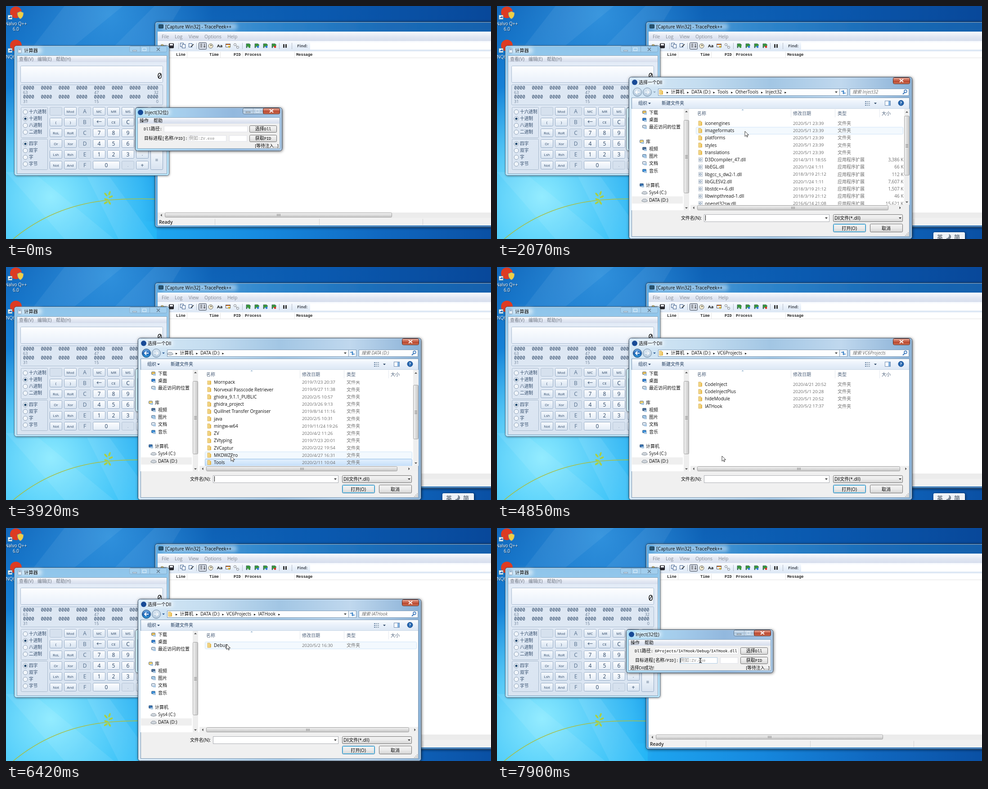
Animation of 1078 by 519 pixels, one loop 8000 ms. Source, as an HTML page:

```html
<!DOCTYPE html>
<html lang="zh">
<head>
<meta charset="utf-8">
<title>Inject</title>
<style>
html,body{margin:0;width:100%;height:100%;overflow:hidden;background:#1478cc}
svg{display:block;width:1078px;height:519px;font:10px 'Open Sans','Noto Sans CJK SC',sans-serif}
text{white-space:pre}
.m{font-family:'Liberation Mono','Noto Sans CJK SC',monospace;font-size:8.7px}
.n{font-family:'Noto Sans Mono','DejaVu Sans Mono',monospace}
.a{font-family:'DejaVu Sans',sans-serif;font-size:8px}
</style>
</head>
<body>
<svg id="stage" viewBox="0 0 1078 519"></svg>
<script>
const stage = document.getElementById('stage');

// ---- drawing helpers
const R = (x, y, w, h, fill, stroke, rx = 0, extra = '') => {
  const o = stroke ? .5 : 0;
  return `<rect x="${x + o}" y="${y + o}" width="${w - 2 * o}" height="${h - 2 * o}" fill="${fill}" stroke="${stroke || 'none'}" rx="${rx}" ${extra}/>`;
};
const T = (x, y, s, fill = '#000', size = 10, extra = '') =>
  `<text x="${x}" y="${y + size * .36}" fill="${fill}" font-size="${size}" ${extra}>${s}</text>`;
const M = (x, y, s, fill = '#000', extra = '') =>
  `<text class="m" x="${x}" y="${y + 3.2}" fill="${fill}" ${extra}>${s.replace(/[\u4e00-\u9fff]+/g, c => `<tspan font-size="10">${c}</tspan>`)}</text>`;
const P = (d, fill = 'none', stroke = 'none', w = 1, extra = '') =>
  `<path d="${d}" fill="${fill}" stroke="${stroke}" stroke-width="${w}" ${extra}/>`;
const C = (x, y, r, fill, stroke = 'none', w = 1) =>
  `<circle cx="${x}" cy="${y}" r="${r}" fill="${fill}" stroke="${stroke}" stroke-width="${w}"/>`;
const G = (id, body, extra = '') => `<g id="${id}" ${extra}>${body}</g>`;
const mid = 'text-anchor="middle"', end = 'text-anchor="end"', bold = 'font-weight="700"';
const down = (x, y, f = '#222', r = 3) => P(`M${x - r},${y - r / 2}h${2 * r}l${-r},${r}z`, f);
const up = (x, y, f = '#444', r = 3) => P(`M${x - r},${y + r / 2}h${2 * r}l${-r},${-r}z`, f);
const left = (x, y) => P(`M${x + 1.5},${y - 3}v6l-3,-3z`, '#444');
const right = (x, y) => P(`M${x - 1.5},${y - 3}v6l3,-3z`, '#444');
const lin = (id, across, ...cols) =>
  `<linearGradient id="${id}" x2="${across ? 1 : 0}" y2="${across ? 0 : 1}">` +
  cols.map((c, i) => `<stop offset="${i / (cols.length - 1)}" stop-color="${c}"/>`).join('') + '</linearGradient>';
const rad = (id, x, y, r, c) =>
  `<radialGradient id="${id}" gradientUnits="userSpaceOnUse" cx="${x}" cy="${y}" r="${r}"><stop stop-color="${c}"/><stop offset="1" stop-color="${c}" stop-opacity="0"/></radialGradient>`;
const clip = (id, x, y, w, h) => `<clipPath id="${id}">${R(x, y, w, h, '#000')}</clipPath>`;
const glow = (x, y, w, h, o = .6) => R(x, y, w, h, '#fff', '', 6, `opacity="${o}" filter="url(#soft)"`);
const frame = (x, y, w, h, fill, line = '#2b4560', shade = 'shade') =>
  R(x, y, w, h, fill, line, 5, `filter="url(#${shade})"`) + R(x + 1, y + 1, w - 2, h - 2, 'none', '#ffffff80', 4);
const hThumb = (x, y, w) => R(x, y, w, 11, 'url(#thumbH)', '#a0a0a0', 2) +
  [-3, 0, 3].map(d => R(x + w / 2 + d, y + 3, 1, 5, '#777')).join('');
const vThumb = (x, y, h) => R(x, y, 12, h, 'url(#thumbV)', '#a0a0a0', 2) +
  [-3, 0, 3].map(d => R(x + 3, y + h / 2 + d, 6, 1, '#777')).join('');
const shadow = (id, blur, o) =>
  `<filter id="${id}" x="-10%" y="-10%" width="120%" height="120%"><feDropShadow dx="1" dy="1" stdDeviation="${blur}" flood-opacity="${o}"/></filter>`;

const defs = '<defs>' +
  lin('sky', 0, '#1167bb', '#1680d6', '#1aa2ee', '#1fb4f6') + lin('night', 1, '#0a57ab00', '#0a5ab0', '#08489a') +
  lin('floor', 1, '#1ea6f0', '#1688de', '#1068c0', '#0a50a4') +
  rad('sea', 100, 425, 260, '#8aeaff') + rad('top', 230, 20, 230, '#2f90dc') +
  lin('glassD', 1, '#62aae0', '#2f86cc', '#1b6cb8', '#1560ac') +
  lin('glassC', 0, '#8ec4ea', '#a8d8f4', '#b4e4fa') + lin('glassOff', 1, '#cdf1fb', '#e6f4fb', '#f8fbfe') +
  lin('glassOn', 1, '#a9dcf5', '#a5cdec', '#92b8de', '#a3c4e4') +
  lin('glassO', 1, '#d6e8f6', '#c4ddf0', '#a2c6e4', '#c0d8ee', '#88b0d6') +
  lin('menu', 0, '#fbfcfe', '#e3e8f3', '#d6deed') + lin('bar', 0, '#fafcff', '#e8f0fa', '#dce7f4') +
  lin('client', 0, '#e4ecf7', '#d9e4f1') + lin('disp', 0, '#fdfeff', '#e9f0fa') +
  lin('key', 0, '#f7fafd', '#e6eef7', '#d8e3f0') + lin('digit', 0, '#fefeff', '#f0f5fb', '#e4ecf6') +
  lin('btn', 0, '#f3f3f3', '#ebebeb', '#d4d4d4') + lin('btnHot', 0, '#eaf6fd', '#c0e4fa', '#98cff0') +
  lin('red', 0, '#e8b6a8', '#cf705a', '#b9452b', '#d58468') + lin('cap', 0, '#dbe8f5', '#b0c8de', '#c8dcee') +
  lin('thumbH', 0, '#f6f6f6', '#dcdcdc', '#c6c6c6') + lin('thumbV', 1, '#f6f6f6', '#dcdcdc', '#c6c6c6') +
  lin('pick', 0, '#e3f0fd', '#c5dffa') + lin('orb', 0, '#7fb8ea', '#1f63b4', '#2f9ad8') + lin('dim', 0, '#dce8f3', '#b3c9dd') +
  clip('page', 0, 0, 1078, 519) + clip('wide', 430, 253, 487, 190) + clip('slim', 430, 253, 474, 190) + clip('dllBox', 351, 267, 186, 14) +
  shadow('shade', 3, .6) + shadow('faint', 2, .4) +
  '<filter id="soft" x="-20%" y="-100%" width="140%" height="300%"><feGaussianBlur stdDeviation="4"/></filter></defs>';

// ---- desktop
const leaf = (x, y, a) => `<ellipse cx="${x}" cy="${y}" rx="5" ry="2" transform="rotate(${a} ${x} ${y})" fill="#a9cf45"/>`;
const shortcut = (x, y) => R(x - 5, y - 5, 10, 10, '#f4f8fc', '#8aa') + P(`M${x - 3},${y + 3}q0,-4 4,-4v-2l3,3l-3,3v-2q-3,0 -4,2z`, '#1b5fb0');
const label = (x, y, s, e = mid) => T(x + 1, y + 1, s, '#0008', 10, e) + T(x, y, s, '#fff', 10, e);
const desktop = R(0, 0, 1078, 519, 'url(#sky)') + R(300, 0, 778, 480, 'url(#night)') + R(335, 480, 743, 39, 'url(#floor)') +
  R(0, 0, 520, 300, 'url(#top)') + R(0, 150, 400, 369, 'url(#sea)') +
  P('M130,0L60,90H150L260,0ZM330,0L230,100H330L390,0Z', '#fff', 'none', 0, 'opacity=".06"') +
  P('M0,370L130,519H240L60,370ZM250,519L180,380H230L330,519Z', '#fff', 'none', 0, 'opacity=".08"') +
  P('M16,519C70,474 140,440 232,432C270,429 300,429 336,430', 'none', '#a6bf45', 1.6) +
  leaf(222, 420, 50) + leaf(230, 417, 110) + leaf(233, 425, -25) + leaf(223, 431, 20) + leaf(230, 438, 60) + leaf(222, 438, -35) +
  C(22, 14, 13, '#dd3b22') + P('M32,12l7,3q0,10 -7,14q-7,-4 -7,-14z', '#f0cf45', '#5a8ac0') + shortcut(9, 25) +
  label(22, 39, 'Nalvo Q++') + label(22, 51, '6.0') +
  C(22, 88, 13, '#dd3b22') + shortcut(9, 99) + label(0, 113, 'NQ6', '');

// ---- log viewer
const sheet = (x, y) => R(x, y, 8, 9, '#f4f9ff', '#41608c');
const flag = (x, c) => P(`M${x - 4},84v9h2v-3h5l3,-3l-3,-3z`, '#3a9a3a', '#235', .6) + C(x + 3, 91, 2.4, c);
const viewer = frame(331, 35, 760, 458, 'url(#glassD)') + glow(346, 39, 168, 14, .45) +
  R(339, 41, 11, 9, '#27536f', '#16364e', 1) + T(354, 46, '[Capture Win32] - TracePeek++', '#000', 10.3) +
  R(337, 57, 741, 21, 'url(#menu)') +
  [[346, 'File'], [375, 'Log'], [406, 'View'], [441, 'Options'], [492, 'Help']].map(([x, s]) => T(x, 68, s, '#848a94', 10.3)).join('') +
  R(337, 78, 741, 23, 'url(#bar)') + R(337, 101, 741, 359, '#fff') +
  P('M342,93l3,-7h4l2,2h6l-3,6z', '#e8c35a', '#554', .8) +
  R(362, 83, 11, 11, '#2c2c34', '#111', 1) + R(364, 84, 7, 4, '#e8e8ee') +
  sheet(387, 82) + sheet(391, 85) + sheet(406, 83) + P('M411,91l6,-6', 'none', '#333', 1.6) +
  R(428, 81, 18, 16, '#d3d9e4', '#3c4656', 2) + P('M432,85h4M432,88h4M432,91h4M441,84v8m-2,-2l2,2l2,-2', 'none', '#222') +
  C(455, 89, 5, '#f5edd0', '#666') + P('M455,86v3l3,-2', 'none', '#333') +
  T(469, 89, 'Aa', '#111', 9.5, bold) +
  R(488, 84, 11, 8, '#fff', '#556') + R(489, 85, 9, 2, '#d87a28') + P('M493,89h6l-3,5z', '#d8b428') +
  C(509, 86, 2.6, 'none', '#888') + C(515, 92, 2.6, 'none', '#888') + P('M511,88l3,3', 'none', '#888') +
  flag(538, '#3a9a3a') + flag(557, '#2b7fd8') + flag(576, '#2b7fd8') + flag(595, '#d8301e') +
  R(616, 85, 3, 8, '#333') + R(621, 85, 3, 8, '#333') +
  [383, 423, 525, 607, 635].map(x => R(x, 82, 1, 14, '#b4bac6')).join('') +
  T(647, 89, 'Find:', '#4a4f58', 9.6, bold) + R(676, 81, 402, 16, '#fff') +
  R(337, 115, 741, 1, '#e2e2e2') + [402, 476, 526, 641].map(x => R(x, 102, 1, 13, '#e4e4e4')).join('') +
  [[378, 'Line'], [452, 'Time'], [506, 'PID'], [531, 'Process'], [645, 'Message']].map(([x, s]) => M(x, 108, s, '#222', bold)).join('') +
  R(337, 460, 741, 12, '#ececec') + left(345, 466) + hThumb(353, 460, 505) +
  R(337, 472, 741, 17, '#f1f1f1') + T(340, 481, 'Ready', '#222', 10.3, 'font-weight="600"') +
  [464, 696, 926].map(x => R(x, 474, 1, 14, '#d4d4d4')).join('');

// ---- calculator
const ink = '#2a4464';
const key = (x, y, s, kind, w = 28, h = 19) => {
  const fill = { d: 'url(#digit)', o: '#d6e1ee', k: 'url(#key)' }[kind], big = /^[\dA-F=←+]$/.test(s);
  return R(x, y, w, h, fill, kind == 'o' ? '#b4c4d6' : '#93a9c3', 2) +
    T(x + w / 2, y + h / 2 + .5, s, kind == 'o' ? '#56708e' : ink, big ? 12 : 8, mid);
};
const keyRows = [' |Mod|A|MC|MR|MS|M+|M-', '(|)|B|←|CE|C|±|√', 'RoL|RoR|C|7|8|9|/|%', 'Or|Xor|D|4|5|6|*|', 'Lsh|Rsh|E|1|2|3|-|=', 'Not|And|F|0||.|+|'];
const keys = keyRows.map((r, j) => r.split('|').map((s, i) => {
  if (!s) return '';
  const kind = i == 2 || s == ' ' || s == '.' ? 'o' : /\d/.test(s) ? 'd' : 'k';
  return key(97 + 32 * i, 225 + 24 * j, s, kind, s == '0' ? 60 : 28, s == '=' ? 44 : 19);
}).join('')).join('');
const radio = (y, s, on) => C(43, y, 5, '#f2f6fb', '#8a9db4') + (on ? C(43, y, 2.6, '#1d4870') : '') + T(51, y, s, ink, 9.7);
const bits = (y, a, b, c) => Array.from({ length: 8 }, (_, i) => T(38 + 39.4 * i, y, '0000', ink, 10.3, 'class="n"')).join('') +
  T(38, y + 10, a, '#6a7d94', 9) + T(196, y + 10, b, '#6a7d94', 9) + T(339, y + 10, c, '#6a7d94', 9, end);
const calc = frame(18, 88, 345, 290, 'url(#glassC)', '#4a6c88', 'faint') + glow(28, 92, 52, 14) +
  R(26, 94, 9, 11, '#e4edf6', '#8098b0', 1) + R(28, 96, 5, 2, '#7da2c4') + T(40, 99, '计算器', '#111', 10.3) +
  R(274, 89, 84, 14, '#ffffff28', '#86acca', 3) + R(298, 90, 1, 12, '#86acca') + R(319, 90, 1, 12, '#86acca') +
  R(281, 98, 10, 3, '#f4fafe', '#7d9ab4') + R(303, 93, 9, 7, 'none', '#e4f1fa') + P('M335,93l7,7m0,-7l-7,7', 'none', '#64798c', 1.6) +
  R(24, 110, 334, 264, 'url(#client)', '#8fa6bb') + R(25, 111, 332, 14, 'url(#menu)') +
  T(29, 118, '查看(V)', '#6f7783') + T(70, 118, '编辑(E)', '#6f7783') + T(111, 118, '帮助(H)', '#6f7783') +
  R(32, 133, 317, 38, 'url(#disp)', '#a9bbd0', 2) + T(347, 156, '0', '#111', 18, end + ' class="n"') +
  R(32, 175, 317, 46, '#dde7f3', '#a9bbd0', 2) + bits(182.5, 63, 47, 32) + bits(202.5, 31, 15, 0) +
  R(33, 225, 60, 69, 'none', '#a9bacd', 2) + R(33, 296, 60, 69, 'none', '#a9bacd', 2) +
  ['十六进制', '十进制', '八进制', '二进制'].map((s, i) => radio(236 + 15 * i, s, i == 1)).join('') +
  ['四字', '双字', '字', '字节'].map((s, i) => radio(307 + 15 * i, s, i == 0)).join('') + keys;

// ---- small dialog
const caps = on => R(526, 227, 83, 14, on ? 'url(#cap)' : '#fbfdfe', on ? '#5c7389' : '#b4bdc6', 3) +
  (on ? R(571, 227, 38, 14, 'url(#red)', '#5e2a22', 3) : R(571, 228, 1, 12, '#c4ccd4')) + R(549, 228, 1, 12, '#a9b8c6') +
  R(533, 235, 10, 3, '#fff', '#6a7886') + R(555, 231, 8, 6, 'none', on ? '#e9f1f8' : '#c0c8d0') +
  P('M586,230.5l8,6.5m0,-6.5l-8,6.5', 'none', on ? '#fff' : '#6a7480', 2);
const glass = on => frame(287, 226, 327, 97, on ? 'url(#glassOn)' : 'url(#glassOff)', on ? '#2b4560' : '#5f7384', on ? 'shade' : 'faint') + caps(on);
const box = (x, y, w, line = '#e2e3ea') => R(x, y, w, 14, '#fff', line);
const push = (y, s, hot) => R(541, y, 61, 16, hot ? 'url(#btnHot)' : 'url(#btn)', hot ? '#3c7fb1' : '#707070', 2) + M(571.5, y + 8, s, '#000', mid);
const inject = G('glassOnBox', glass(true)) + G('glassOffBox', glass(false)) + glow(304, 230, 62, 13) +
  C(299, 237, 6, '#174a96') + T(308, 237, 'Inject(32位)') +
  R(292, 248, 317, 70, '#f0f0f0', '#8fa8be') + R(293, 249, 315, 13, 'url(#menu)') +
  T(297, 255, '操作') + T(328, 255, '帮助') +
  M(306, 274, 'Dll路径:') + box(351, 267, 186) + G('dllPath', M(351, 274, '6Projects/IATHook/Debug/IATHook.dll'), 'clip-path="url(#dllBox)"') +
  G('plain', push(266, '选择Dll')) + G('hot', push(266, '选择Dll', true)) + push(287, '获取PID') +
  M(307, 295, '目标进程[名称/PID]:') + box(406, 288, 84) + G('focus', box(406, 288, 84, '#b0cde6') + R(407, 290, 1, 10, '#000')) +
  M(407, 295, '例如:ZV.exe', '#8a8a8a') + box(496, 288, 40) +
  G('done', T(296, 311.5, '选择Dll成功!', '#000', 9.7)) + T(606, 311.5, '[等待注入...]', '#000', 9.7, end);

// ---- file dialog
const folder = (x, y) => P(`M${x - 4},${y - 5}h5l1,2v8h-6z`, '#f3d582', '#d1a544', .7) + P(`M${x + 1},${y - 3}h3v8h-3z`, '#e8bc55');
const dll = (x, y) => R(x - 4, y - 5, 9, 10, '#fafcff', '#a9b6c4') + C(x, y, 2.3, '#d7e4f0', '#6b8099');
const drive = (x, y) => P(`M${x - 6},${y + 1}l3,-3h6l3,3v2q-6,3 -12,0z`, '#cfd5db', '#77818c', .8);
const glyph = (x, y, c) => R(x - 5, y - 4, 9, 7, c, '#58708a', 1) + R(x - 1, y + 1, 6, 4, '#a9c8e4');
const tree = [[237, '下载', '#e7bd58'], [253, '桌面', '#2f7dd0'], [269, '最近访问的位置', '#cbd8e4'], [302, '库', '#f0d070'], [318, '视频', '#4a6c96'],
  [334, '图片', '#9fc6e6'], [350, '文档', '#dce6f0'], [367, '音乐', '#3c8fd8'], [399, '计算机', '#356fae'], [415, 'Sys4 (C:)'], [432, 'DATA (D:)']];
const side = R(299, 229, 116, 226, '#fff') + R(300, 424, 113, 16, '#efefef') + tree.map(([y, s, c]) => {
  const root = s == '库' || s == '计算机';
  return (c ? glyph(root ? 322 : 328, y, c) : drive(328, y)) + T(root ? 331 : 338, y, s, '#111');
}).join('') + R(415, 229, 12, 226, '#eee') + up(421, 235) + down(421, 450, '#444') + vThumb(415, 254, 163);
const dialog = frame(293, 158, 630, 361, 'url(#glassO)') + glow(312, 163, 60, 13) +
  G('appDot', C(306, 170, 6, '#174a96')) +
  G('caption', T(315, 170, '选择一个Dll')) +
  R(880, 159, 38, 15, 'url(#red)', '#5e2a22', 3) + P('M895,163l8,6.5m0,-6.5l-8,6.5', 'none', '#fff', 2) +
  C(334, 192, 9.5, 'url(#dim)', '#6f8aa4') + P('M329,192h9m-4,-4l4,4l-4,4', 'none', '#f3f7fb', 2) +
  R(358, 184, 404, 16, '#fdfeff', '#7f9ab4') + R(761, 184, 18, 16, '#f4f8fc', '#7f9ab4') + down(754, 192) +
  P('M765,190h6m-2,-2l2,2l-2,2M775,194h-6m2,-2l-2,2l2,2', 'none', '#2b78c2', 1.3) +
  R(784, 184, 132, 16, '#fdfeff', '#7f9ab4') + C(908, 190, 3, 'none', '#2e6db4', 1.4) + P('M906,192.5l-4,4', 'none', '#2e6db4', 1.8) +
  G('nav', '') +
  R(299, 204, 618, 310, '#fff', '#7d98b2') + R(300, 205, 616, 24, 'url(#bar)') + R(300, 228, 616, 1, '#c8d6e6') +
  T(314, 216, '组织', '#1e395b') + down(339, 217, '#1e395b') + T(366, 216, '新建文件夹', '#1e395b') +
  [212, 216, 220].map(y => R(818, y, 3, 2, '#6d87a6') + R(822, y, 3, 2, '#9ab') + R(826, y, 3, 2, '#9ab')).join('') + down(841, 217, '#1e395b') +
  R(862, 211, 13, 11, '#fff', '#6e8bb0') + R(870, 212, 4, 9, '#7fb0e0') + C(898, 216, 6, '#2466b0', '#16488a') + T(898, 216, '?', '#fff', 9, mid + ' ' + bold) +
  side + G('list', '') +
  R(300, 455, 616, 58, '#f0f0f0') + T(455, 472, '文件名(N):', '#000', 10, end) +
  R(460, 464, 279, 17, '#fff', '#abadb3') + down(732, 472.5) + G('caret', R(463, 466, 1, 12, '#000')) + G('fname', T(463, 472, 'IATHook.dll')) +
  R(747, 464, 155, 17, 'url(#btn)', '#707070', 2) + T(750, 472, 'Dll文件(*.dll)') + down(896, 472.5) +
  R(747, 485, 73, 19, 'url(#btn)', '#3c7fb1', 2) + R(748, 486, 71, 17, 'none', '#58c8ee', 2) + T(783, 495, '打开(O)', '#000', 10, mid) +
  R(829, 485, 73, 19, 'url(#btn)', '#707070', 2) + T(865, 495, '取消', '#000', 10, mid) +
  [[0, 0], [-3, 0], [-6, 0], [0, -3], [-3, -3], [0, -6]].map(([x, y]) => R(913 + x, 510 + y, 2, 2, '#bbb')).join('');

const ime = R(970, 504, 70, 20, '#eef2f7', '#fff', 2, 'filter="url(#shade)"') + T(978, 515, '英', '#6b7683', 13, bold) +
  P('M1004,508a6,6 0 1 1 -6,9a6,6 0 0 0 6,-9z', '#7c8896') + T(1016, 515, '简', '#6b7683', 13, bold);

stage.innerHTML = defs + `<g clip-path="url(#page)">` + desktop + viewer + calc + inject + G('ime', ime) + G('dialog', dialog) +
  G('arrow', P('M0,0V11.5L2.8,9L4.6,13L6.4,12.2L4.6,8.3H8.5Z', '#fff', '#222', .9)) +
  G('beam', P('M-3,-5q3,0 3,2q0,-2 3,-2M0,-4V4M-3,5q3,0 3,-2q0,2 3,2', 'none', '#111', 1.2)) + '</g>';
const el = {};
stage.querySelectorAll('g[id]').forEach(g => el[g.id] = g);

// ---- data: name|date|size, no size means a folder
const parse = s => s.split('\n').map(r => r.split('|'));
const places = [
  { at: 0, path: 'DATA (D:)/Tools/OtherTools/Inject32', thumb: 133, rows: parse(`iconengines|2020/5/1 23:39
imageformats|2020/5/1 23:39
platforms|2020/5/1 23:39
styles|2020/5/1 23:39
translations|2020/5/1 23:39
D3Dcompiler_47.dll|2014/3/11 18:55|3,386 KB
libEGL.dll|2020/1/24 1:11|66 KB
libgcc_s_dw2-1.dll|2018/3/19 21:12|112 KB
libGLESV2.dll|2020/1/24 1:11|7,607 KB
libstdc++-6.dll|2018/3/19 21:12|1,507 KB
libwinpthread-1.dll|2018/3/19 21:12|46 KB
opengl32sw.dll|2016/6/14 21:08|15,621 KB`) },
  { at: 2850, path: 'DATA (D:)', thumb: 121, rows: parse(`archive|2019/7/23 19:40
backup|2019/8/2 10:15
Mornpack|2019/7/23 20:37
Norvexal Passcode Retriever|2019/9/27 11:38
ghidra_9.1.1_PUBLIC|2020/2/5 10:57
ghidra_project|2020/3/26 9:13
Quillnet Transfer Organiser|2019/8/14 11:16
java|2020/2/5 10:31
mingw-w64|2019/11/24 19:26
ZV|2020/4/2 11:26
ZVtyping|2019/7/23 20:01
ZVCaptur|2020/2/22 19:54
MKDWZPro|2020/4/27 16:31
Tools|2020/2/11 10:04
VC6Projects|2020/5/2 17:30
worknotes|2020/3/8 14:22`) },
  { at: 4850, path: 'DATA (D:)/VC6Projects', rows: parse(`CodeInject|2020/4/21 20:52
CodeInjectPlus|2020/5/1 20:28
hideModule|2020/5/1 20:52
IATHook|2020/5/2 17:37`) },
  { at: 6250, path: 'DATA (D:)/VC6Projects/IATHook', rows: parse('Debug|2020/5/2 16:30') },
  { at: 6640, path: 'DATA (D:)/VC6Projects/IATHook/Debug', rows: parse('IATHook.dll|2020/5/2 16:30|221 KB') }
];
const picks = [[0, -1], [2850, 13], [4550, 14], [4850, -1], [6080, 3], [6250, -1], [6500, 0], [6640, -1], [7200, 0]];
const rowH = 16.25, listTop = 253;

function navHTML(p, hot) {
  const parts = p.path.split('/'), open = p.at > 0;
  const tri = d => `<tspan class="a" dx="${d}">▸</tspan>`;
  return C(312, 192, 9.5, open ? 'url(#orb)' : 'url(#dim)', open ? '#1c3f6e' : '#6f8aa4') +
    P('M317,192h-9m4,-4l-4,4l4,4', 'none', '#fff', 2) + down(350, 192, open ? '#1d4f8c' : '#8aa0b6') +
    (hot ? R(432, 185, 63, 14, 'url(#btnHot)', '#8cc0e0') : '') +
    (p.path == 'DATA (D:)' ? drive(365, 192) : folder(365, 192)) +
    T(377, 191.5, tri(0) + ['计算机', ...parts].map(s => `<tspan dx="5.5">${s}</tspan>` + tri(6)).join(''), '#111') +
    T(790, 191.5, '搜索 ' + parts[parts.length - 1], '#6d6d6d', 10, 'font-style="italic"');
}

function listHTML(p, scroll, hover, pick) {
  const edge = p.thumb ? 903 : 913;
  let s = up(546, 231, '#8fb0cc', 2.5) + [653, 751, 850].map(x => R(x, 230, 1, 18, '#e3e8ee')).join('') +
    [[445, '名称'], [658, '修改日期'], [757, '类型'], [855, '大小']].map(([x, w]) => T(x, 239, w, '#4c607a')).join('');
  s += `<g clip-path="url(#${p.thumb ? 'slim' : 'wide'})">` + p.rows.map(([name, date, size], i) => {
    const y = listTop + 8.2 + i * rowH - scroll;
    const mark = i == pick ? R(442, y - 8, edge - 442, 16.5, 'url(#pick)', '#94bde6', 2)
      : i == hover ? R(442, y - 8, edge - 442, 16.5, '#f3f9fe', '#cfe4f7', 2) : '';
    return mark + (size ? dll : folder)(452, y) + T(462, y, name, '#111') + T(658, y, date, '#6d6d6d', 9.8) +
      T(757, y, size ? '应用程序扩展' : '文件夹', '#6d6d6d') + (size ? T(910, y, size, '#6d6d6d', 10, end) : '');
  }).join('') + '</g>';
  if (p.thumb) s += R(905, 229, 12, 214, '#efefef') + up(911, 236) + down(911, 437, '#444') + vThumb(905, 244.5 + scroll * .49, p.thumb);
  return s + R(430, 443, 486, 12, '#efefef') + left(437, 449.5) + hThumb(445, 444, p.thumb ? 425 : 451) + right(p.thumb ? 896 : 909, 449.5);
}

// ---- motion
const route = [[290, 518, 524], [1000, 566, 267], [1150, 562, 279], [1950, 562, 279], [2060, 551, 279], [2140, 551, 279], [2700, 462, 188],
  [2950, 462, 188], [3620, 500, 421], [4950, 500, 421], [5450, 500, 260], [5790, 500, 260], [6000, 497, 306], [6250, 497, 306],
  [6420, 490, 259], [6890, 490, 259], [7040, 490, 264], [7400, 490, 264], [7840, 452, 295]];
const clamp = v => Math.max(0, Math.min(1, v));
const ease = v => v * v * (3 - 2 * v);
const last = (list, t, f) => list.filter(e => f(e) <= t).pop();

function mouse(t) {
  const i = route.findIndex(k => k[0] > t);
  if (i == 0) return [0, 600];
  if (i < 0) return route[route.length - 1].slice(1);
  const [t0, x0, y0] = route[i - 1], [t1, x1, y1] = route[i], v = ease((t - t0) / (t1 - t0));
  return [x0 + (x1 - x0) * v, y0 + (y1 - y0) * v];
}

const cache = {};
function fill(id, k, make) {
  if (cache[id] !== k) { cache[id] = k; el[id].innerHTML = make(); }
}
const show = (id, on) => el[id].style.display = on ? '' : 'none';

function draw(t) {
  const [x, y] = mouse(t), shut = clamp((t - 7280) / 260), grow = ease(clamp((t - 1850) / 190));
  const open = t >= 1850 && shut < 1, live = t < 1230 || t >= 7400;
  const place = last(places, t, p => p.at), pick = last(picks, t, p => p[0])[1];
  const scroll = place.at == 2850 ? 37 + 33 * clamp((t - 4050) / 80) : 0;

  show('glassOnBox', live); show('glassOffBox', !live);
  const hot = t >= 1150 && t < 7400;
  show('hot', hot); show('plain', !hot);
  show('dllPath', t >= 7400); show('done', t >= 7400); show('focus', t >= 7850);
  show('ime', t >= 1300 && t < 5900);

  show('dialog', open);
  if (open) {
    const k = t < 7280 ? .95 + .05 * grow : 1 - .05 * shut;
    el.dialog.setAttribute('opacity', t < 7280 ? grow : 1 - shut * shut);
    el.dialog.setAttribute('transform', `translate(608 339) scale(${k}) translate(-608 -339)`);
    show('appDot', t < 7280);
    el.caption.setAttribute('transform', t < 7280 ? '' : 'translate(-16 2)');
    show('caret', t < 4550); show('fname', t >= 7200);
    const row = Math.floor((y - listTop + scroll) / rowH);
    const hover = grow > .9 && x > 442 && y > listTop && y < 443 && row < place.rows.length ? row : -1;
    const crumb = t > 2140 && t < 3200 && y < 200;
    fill('nav', place.at + ':' + crumb, () => navHTML(place, crumb));
    fill('list', [place.at, scroll, hover, pick].join(), () => listHTML(place, scroll, hover, pick));
  }

  const beam = !open && x > 351 && x < 537 && (y > 267 && y < 281 || y > 288 && y < 302);
  show('beam', beam); show('arrow', !beam);
  el[beam ? 'beam' : 'arrow'].setAttribute('transform', `translate(${x} ${y})`);
}

const start = performance.now();
function tick() {
  draw((performance.now() - start) % 8000);
  requestAnimationFrame(tick);
}
draw(0);
requestAnimationFrame(tick);
</script>
</body>
</html>
```
